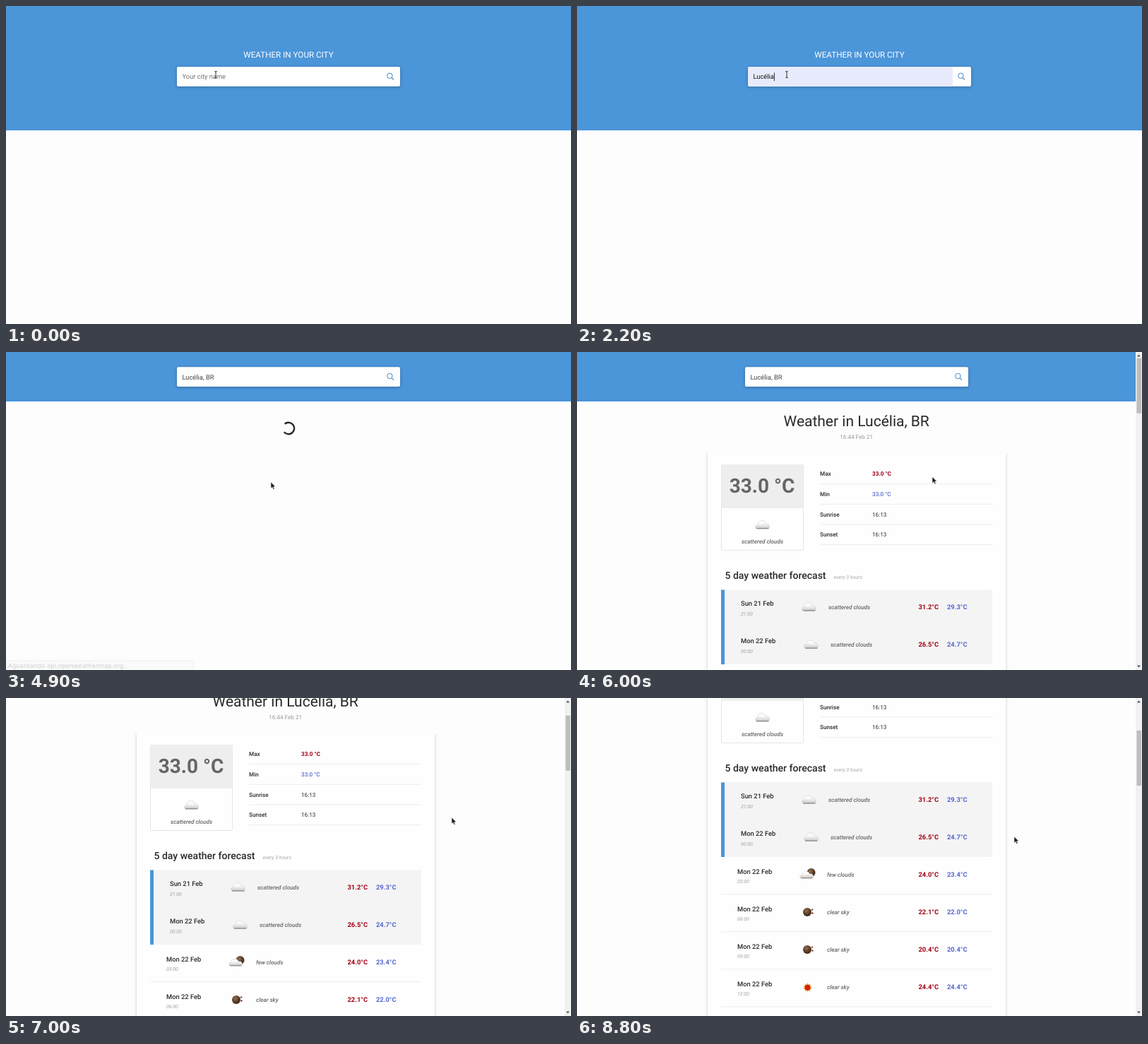
These frames come from a looping animation (800x450 px, 9000 ms). An HTML page:

```html
<!DOCTYPE html>
<html lang="en">
<head>
<meta charset="utf-8">
<title>Weather in your city</title>
<style>
  html, body { margin: 0; width: 100%; height: 100%; overflow: hidden; background: #fefdfe; }
  svg { display: block; width: 800px; height: 450px; font-family: Roboto, sans-serif; text-rendering: geometricPrecision; }
  .raised { filter: drop-shadow(0 1.5px 2px rgba(0, 0, 0, .28)); }
  .card { filter: drop-shadow(0 1px 2px rgba(0, 0, 0, .2)); }
</style>
</head>
<body>
<svg id="stage" viewBox="0 0 800 450"></svg>
<script>
const LOOP = 9000, STEP = 100;
const BLUE = '#4b95d9', RED = '#a00014', INDIGO = '#5468d0', INK = '#2a2a2a';
const CITY = 'Lucélia';

const text = (x, y, size, fill, str, extra = '') =>
  `<text x="${x}" y="${y}" font-size="${size}" fill="${fill}" ${extra}>${str}</text>`;
const rect = (x, y, w, h, fill, extra = '') =>
  `<rect x="${x}" y="${y}" width="${w}" height="${h}" fill="${fill}" ${extra}/>`;
const group = (id, body, extra = '') => `<g id="${id}" ${extra}>${body}</g>`;
const at = (x, y, body) => `<g transform="translate(${x} ${y})">${body}</g>`;
const MID = 'text-anchor="middle"', MEDIUM = 'font-weight="500"', BOLD = 'font-weight="700"';
const ITALIC = 'font-style="italic"';

const cloud = `<path d="M-7 6C-11 6-11 1-7 1C-7-3-4-5.5-1-5.5C2-5.5 4-4 4.5-1C8-2 10 0 10 3C10 5 9 6 7 6Z"
  fill="url(#cloudFill)" stroke="#c6c4c2" stroke-width=".5"/>
  <path d="M-8 5.8H8.5" stroke="#777" stroke-width="1" stroke-linecap="round"/>`;
const moonDisc = '<circle r="6" fill="url(#moonFill)"/>';
const star = (x, y) => `<path d="M${x - 1.5} ${y}h3M${x} ${y - 1.5}v3" stroke="#8d4a35" stroke-width="1"/>`;
const sunRays = Array.from({ length: 10 }, (_, i) =>
  `<path d="M-1.5-3.5L0-7L1.5-3.5Z" transform="rotate(${i * 36})"/>`).join('');
const icons = {
  cloud,
  few: at(5, -2.5, moonDisc) + at(-1.5, .5, `<g transform="scale(.95 .85)">${cloud}</g>`),
  moon: at(-.5, .5, moonDisc) + star(6.5, -3) + star(7, 2),
  sun: at(0, 1, `<g fill="#e8b33c">${sunRays}</g><circle r="4" fill="#d8200f"/>`)
};

const searchBox = `
  ${rect(0, 0, 316, 27.7, '#fefefe', 'rx="2" class="raised"')}
  <g fill="none" stroke="#4684c4"><circle cx="301.4" cy="12.7" r="3.7"/><path d="M304.2 15.5L307 18.3" stroke-width="1.2"/></g>`;

const details = [['Max', '33.0 °C', RED, BOLD], ['Min', '33.0 °C', INDIGO, MEDIUM],
  ['Sunrise', '16:13', INK, ''], ['Sunset', '16:13', INK, '']]
  .map(([label, value, color, weight], i) => {
    const y = 175.1 + 28.7 * i;
    return text(344, y, 8.17, INK, label, MEDIUM) + text(418, y, 8.17, color, value, weight) +
      rect(344, y + 11.1, 245, .9, '#ececec');
  }).join('');

const forecast = [
  ['Sun 21', '21:00', 'cloud', 'scattered clouds', 31.2, 29.3, 5, 328.5],
  ['Mon 22', '00:00', 'cloud', 'scattered clouds', 26.5, 24.7, 5, 331.5],
  ['Mon 22', '03:00', 'few', 'few clouds', 24, 23.4, 0, 326.5],
  ['Mon 22', '06:00', 'moon', 'clear sky', 22.1, 22, 0, 326.5],
  ['Mon 22', '09:00', 'moon', 'clear sky', 20.4, 20.4, 0, 326.5],
  ['Mon 22', '12:00', 'sun', 'clear sky', 24.4, 24.4, 0, 326.5]
].map(([day, hour, icon, sky, high, low, indent, iconX], i) => {
  const y = 360.2 + 53.1 * i;
  return text(227 + indent, y - .9, 9.33, INK, day + ' Feb', MEDIUM) +
    text(227 + indent, y + 12.7, 7, '#a0a0a0', hour, ITALIC) +
    at(iconX, y, icons[icon]) +
    text(iconX + 27.5, y + 3.3, 8.17, '#666', sky, ITALIC + MEDIUM) +
    text(483.5, y + 3.3, 9.33, RED, high.toFixed(1) + '°C', BOLD) +
    text(524, y + 3.3, 9.33, INDIGO, low.toFixed(1) + '°C', BOLD) +
    (i > 1 ? rect(204, y + 27.8, 384, .9, '#ebebeb') : '');
}).join('');

const report = `
  ${rect(185, 143, 422, 2300, '#fefefe', 'class="card"')}
  ${rect(180, 138, 432, 5, '#fefdfe')}
  ${text(395.7, 105, 21, INK, `Weather in ${CITY}, BR`, MID)}
  ${text(395.7, 122.5, 8.17, '#999', '16:44 Feb 21', MID)}
  ${rect(204.5, 159.5, 116, 121, '#fefefe', 'rx="1.5" stroke="#e0e7e5"')}
  ${rect(204.5, 159, 116, 62, '#eeeeee')}
  ${text(262, 198.6, 28, '#666', '33.0 °C', BOLD + MID)}
  ${at(262.5, 244, cloud)}
  ${text(262.5, 271.4, 8.17, '#666', 'scattered clouds', ITALIC + MEDIUM + MID)}
  ${details}
  ${text(209.5, 321, 14, INK, '5 day weather forecast', MEDIUM)}
  ${text(363.5, 320.8, 7, '#a5a5a5', 'every 3 hours', ITALIC)}
  ${rect(204, 336.5, 384, 105.5, '#f5f4f4')}${rect(204, 336.5, 5, 105.5, BLUE)}
  ${forecast}`;

const stage = document.getElementById('stage');
stage.innerHTML = `
  <defs>
    <linearGradient id="cloudFill" x2="0" y2="1"><stop offset=".35" stop-color="#fcfbfa"/><stop offset="1" stop-color="#c9c7c5"/></linearGradient>
    <radialGradient id="moonFill" cx=".4" cy=".35"><stop offset="0" stop-color="#94714f"/><stop offset="1" stop-color="#4b301f"/></radialGradient>
  </defs>
  ${rect(0, 0, 800, 450, '#fefdfe')}
  ${group('page', `
    ${rect(0, 0, 800, 176, BLUE, 'id="banner"')}
    ${text(400, 73.2, 11.67, '#fff', 'WEATHER IN YOUR CITY', MID + ' id="title"')}
    ${group('report', report)}
    ${group('search', searchBox + rect(0, 0, 290, 27.7, '#e8ebfc', 'rx="2" id="autofill"') +
      text(7.5, 17.4, 9.33, INK, '', 'id="query"') + rect(0, 8.5, .9, 11.5, '#111', 'id="caret"'))}`)}
  ${group('popup', rect(242, 114.5, 290, 51, '#fefefe', 'class="card"') +
    rect(242, 118, 290, 20, '#e9e9ec', 'id="hover"') + text(249.5, 131.3, 9.33, INK, CITY))}
  ${group('card', rect(189, 152.5, 422, 75, '#fdfefd', 'rx="2" class="card" id="cardBox"') +
    text(209, 193, 9.33, INK, CITY + ', BR', 'id="result"'))}
  <circle id="spinner" r="8.2" fill="none" stroke="#25262b" stroke-width="2.4" pathLength="4" stroke-dasharray="3 1" stroke-dashoffset="-.5"/>
  ${group('status', rect(-1, 436.5, 267, 15, '#f4f4f4', 'stroke="#ccc" stroke-width=".8" rx="2"') +
    text(3, 446.7, 8.6, '#555', 'Aguardando api.openweathermap.org...', 'font-family="DejaVu Sans, sans-serif"'))}
  ${group('scrollbar', rect(791, 0, 9, 450, '#f1f1f1') + rect(792.5, 0, 6.5, 78, '#bdbdbd', 'id="thumb"') +
    '<path d="M793 6.5l2.5-3l2.5 3zM793 443.5l2.5 3l2.5-3z" fill="#555"/>')}
  <path id="beam" d="M-1.8-4.7Q0-4.7 0-3.5Q0-4.7 1.8-4.7M0-4V4M-1.8 4.7Q0 4.7 0 3.5Q0 4.7 1.8 4.7" fill="none" stroke="#333" stroke-width="1"/>
  <path id="arrow" d="M0 0V9.2L2.1 7.3L3.6 10.6L5.2 9.9L3.7 6.7H6.6Z" fill="#1a1a1a" stroke="#fff" stroke-width=".6"/>`;

const el = {};
stage.querySelectorAll('[id]').forEach(node => el[node.id] = node);
const show = (node, on) => node.setAttribute('visibility', on ? 'inherit' : 'hidden');
const move = (node, x, y, more = '') => node.setAttribute('transform', `translate(${x} ${y})${more}`);

// Linear interpolation through [time, value] pairs.
function track(keys, t) {
  if (t <= keys[0][0]) return keys[0][1];
  for (let i = 1; i < keys.length; i++) {
    const [t0, a] = keys[i - 1], [t1, b] = keys[i];
    if (t < t1) return a + (b - a) * (t - t0) / (t1 - t0);
  }
  return keys[keys.length - 1][1];
}
const scrollKeys = [[6300, 0], [6600, 31], [7000, 93], [7200, 93], [7500, 155], [8000, 217]];
const pointerX = [[3500, 297], [4400, 375], [5800, 375], [6200, 631], [7100, 631], [7500, 620], [8000, 619]];
const pointerY = [[3500, 97], [4400, 184], [5800, 184], [6200, 169], [7100, 169], [7500, 194], [8000, 196]];

function draw(t) {
  const home = t < 4500, loaded = t >= 5500;
  const scroll = track(scrollKeys, t);

  move(el.page, 0, -scroll);
  el.banner.setAttribute('height', home ? 176 : 70);
  show(el.title, home);
  show(el.report, loaded);
  show(el.scrollbar, loaded);
  el.thumb.setAttribute('y', 8.7 + scroll * .172);
  move(el.search, loaded ? 238 : 242, home ? 86 : 21.3);

  const picked = t >= 2200;
  const typed = t < 900 ? 0 : t < 1200 ? 1 : t < 1500 ? 2 : 3;
  const value = !home ? CITY + ', BR' : picked ? CITY : CITY.slice(0, typed);
  el.query.textContent = value || 'Your city name';
  el.query.setAttribute('fill', !value ? '#757575' : t < 2500 ? '#111' : '#444');
  show(el.autofill, picked && t < 2500);
  show(el.caret, t >= 400 && t < 2500);
  el.caret.setAttribute('x', value ? 7.5 + el.query.getComputedTextLength() : 7.5);
  show(el.popup, t >= 900 && !picked);
  show(el.hover, t >= 1900 && !picked);

  const found = t >= 3600;
  show(el.card, t >= 2500 && home);
  el.cardBox.setAttribute('height', found ? 100 : 75);
  show(el.result, found && home);

  show(el.spinner, t >= 2500 && !found || !home && !loaded);
  const turn = (t - (home ? 2588 : 4515)) * .48;
  move(el.spinner, 400, home ? 190 : 108, ` rotate(${turn + 45})`);

  show(el.status, !home && t < 5100);
  el.status.setAttribute('opacity', track([[4700, 1], [4900, .28], [5000, 0]], t));

  const x = track(pointerX, t), y = track(pointerY, t);
  const overText = y < 114;
  show(el.beam, overText);
  show(el.arrow, !overText);
  move(overText ? el.beam : el.arrow, x, y);
}

// The dash pattern starts at angle 0: place the gap around it.
el.spinner.setAttribute('stroke-dashoffset', '0');
const start = performance.now();
function tick(now) {
  const t = Math.max(0, now - start) % LOOP;
  draw(Math.floor(t / STEP) * STEP);
  requestAnimationFrame(tick);
}
draw(0);
requestAnimationFrame(tick);
</script>
</body>
</html>
```
